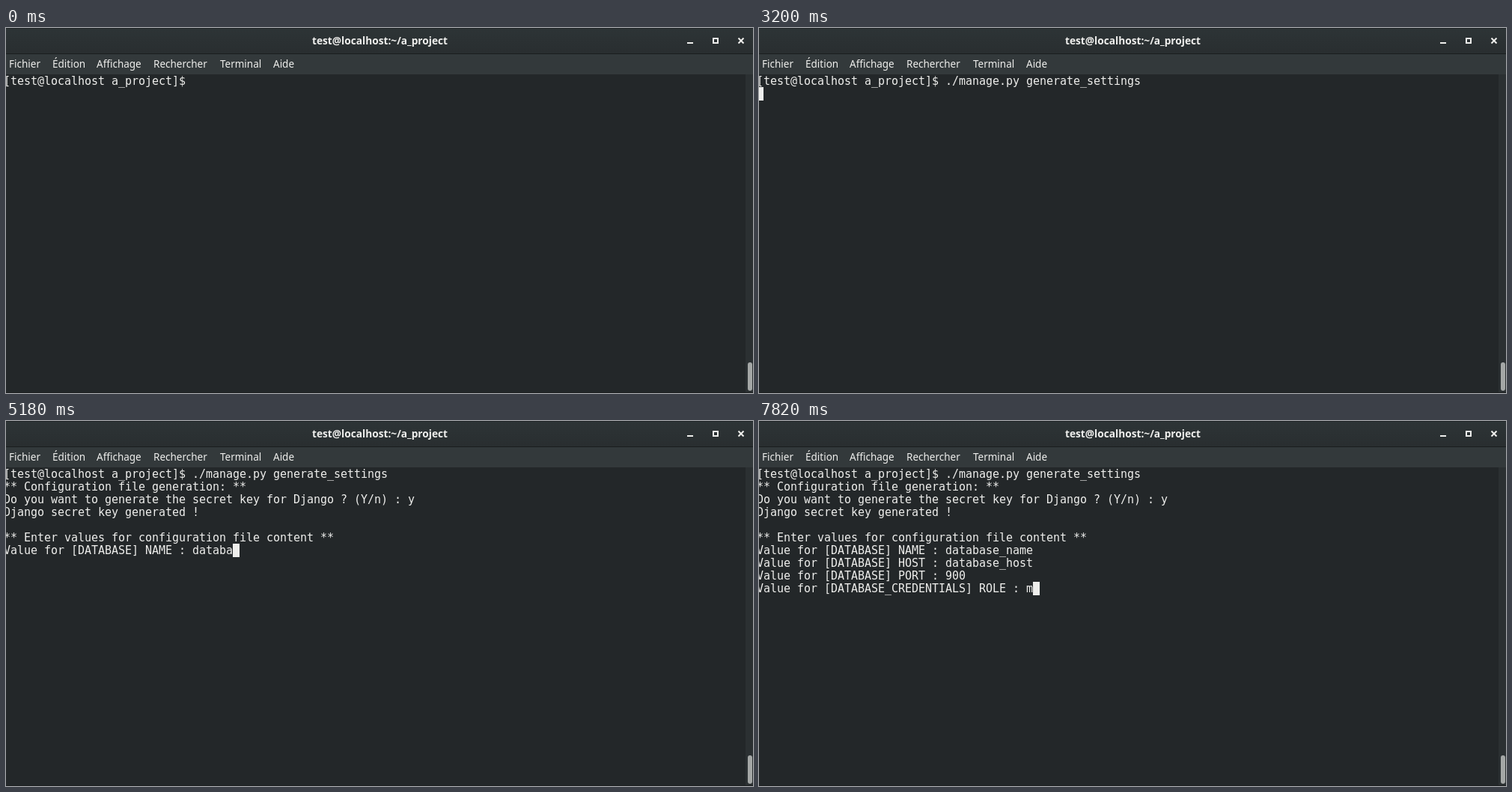
An HTML page with a canvas that plays this animation: 998x488 px, repeating every 8 s.

```html
<!DOCTYPE html>
<html lang="fr">
<head>
<meta charset="utf-8">
<title>Terminal</title>
<style>
  html, body { margin: 0; width: 100%; height: 100%; overflow: hidden; background: #232729; }
  canvas { display: block; }
</style>
</head>
<body>
<canvas id="stage" width="998" height="488"></canvas>
<script>
const ctx = document.getElementById('stage').getContext('2d');
const LOOP = 8000, TYPING_START = 1000, STEP = 220;
const CELL = 9, ROW = 17, LEFT = -3, TOP = 62;
const INK = '#eeeeec';
const ACCOUNT = 'test';

// Each entry: what the program prints, then what is typed in reply.
const session = [
  [`[${ACCOUNT}@localhost a_project]$ `, './manage.py generate_settings\n'],
  ['** Configuration file generation: **\n' +
   'Do you want to generate the secret key for Django ? (Y/n) : ', 'y\n'],
  ['Django secret key generated !\n\n' +
   '** Enter values for configuration file content **\n' +
   'Value for [DATABASE] NAME : ', 'database_name\n'],
  ['Value for [DATABASE] HOST : ', 'database_host\n'],
  ['Value for [DATABASE] PORT : ', '900\n'],
  ['Value for [DATABASE_CREDENTIALS] ROLE : ', 'm']
];

// Total keys pressed by the end of each step.
const keysAtStep = [
  3, 6, 8, 11, 14, 17, 19, 22, 25, 27, 30, 30, 30, 30, 30,
  32, 32, 32, 35, 38, 41, 44, 47, 49, 52, 54, 54, 56, 58, 60, 63, 65
];
const blinkedOff = [-1, 12, 16, 17];
const COMMAND_READY = 13;

function rect(color, x, y, w, h) {
  ctx.fillStyle = color;
  ctx.fillRect(x, y, w, h);
}

function label(text, x, y, font, align = 'left') {
  ctx.font = font;
  ctx.textAlign = align;
  ctx.fillStyle = INK;
  ctx.fillText(text, x, y);
}

function drawTitleBar() {
  const shade = ctx.createLinearGradient(0, 0, 0, 34);
  shade.addColorStop(0, '#2d3436');
  shade.addColorStop(1, '#292e30');
  rect(shade, 0, 0, 998, 34);
  rect('#1f2426', 0, 0, 998, 1);
  rect('#1a1d1e', 0, 34, 998, 1);
  label(`${ACCOUNT}@localhost:~/a_project`, 590, 22,
    'bold 13.7px "Noto Sans", "Open Sans", sans-serif', 'right');

  rect(INK, 910, 19, 8, 2);
  ctx.strokeStyle = INK;
  ctx.lineWidth = 2;
  ctx.strokeRect(945, 14, 6, 6);
  ctx.beginPath();
  ctx.moveTo(978.5, 13.5);
  ctx.lineTo(985.5, 20.5);
  ctx.moveTo(985.5, 13.5);
  ctx.lineTo(978.5, 20.5);
  ctx.stroke();
}

function drawMenu() {
  rect('#33393b', 0, 35, 998, 27);
  const items = { 'Fichier': 4, 'Édition': 62, 'Affichage': 121,
    'Rechercher': 197, 'Terminal': 286, 'Aide': 357 };
  for (const [name, x] of Object.entries(items)) {
    label(name, x, 53, '13.5px "Noto Sans", "Open Sans", sans-serif');
  }
}

function drawScrollbar() {
  rect('#2b3032', 988, 62, 10, 426);
  ctx.fillStyle = '#a4a7a6';
  ctx.beginPath();
  ctx.roundRect(991, 447, 6, 38, 3);
  ctx.fill();
}

function screenText(step) {
  let left = step < 0 ? 0 : keysAtStep[step];
  let text = '';
  for (const [i, [output, reply]] of session.entries()) {
    if (i === 1 && step < COMMAND_READY) break;
    text += output + reply.slice(0, left);
    left -= reply.length;
    if (left < 0) break;
  }
  return text;
}

function drawTerminal(step) {
  const lines = screenText(step).split('\n');
  lines.forEach((line, row) => {
    [...line].forEach((char, col) => {
      label(char, LEFT + col * CELL, TOP + 14 + row * ROW,
        '15px "DejaVu Sans Mono", monospace');
    });
  });
  if (!blinkedOff.includes(step)) {
    const row = lines.length - 1;
    rect(INK, LEFT + lines[row].length * CELL, TOP + row * ROW, CELL, 18);
  }
}

function frame(now) {
  const time = now % LOOP;
  const step = Math.max(-1, Math.floor((time - TYPING_START) / STEP));
  rect('#232729', 0, 0, 998, 488);
  drawTitleBar();
  drawMenu();
  drawScrollbar();
  rect('#1c1f20', 0, 487, 998, 1);
  drawTerminal(step);
  requestAnimationFrame(frame);
}
requestAnimationFrame(frame);
</script>
</body>
</html>
```
